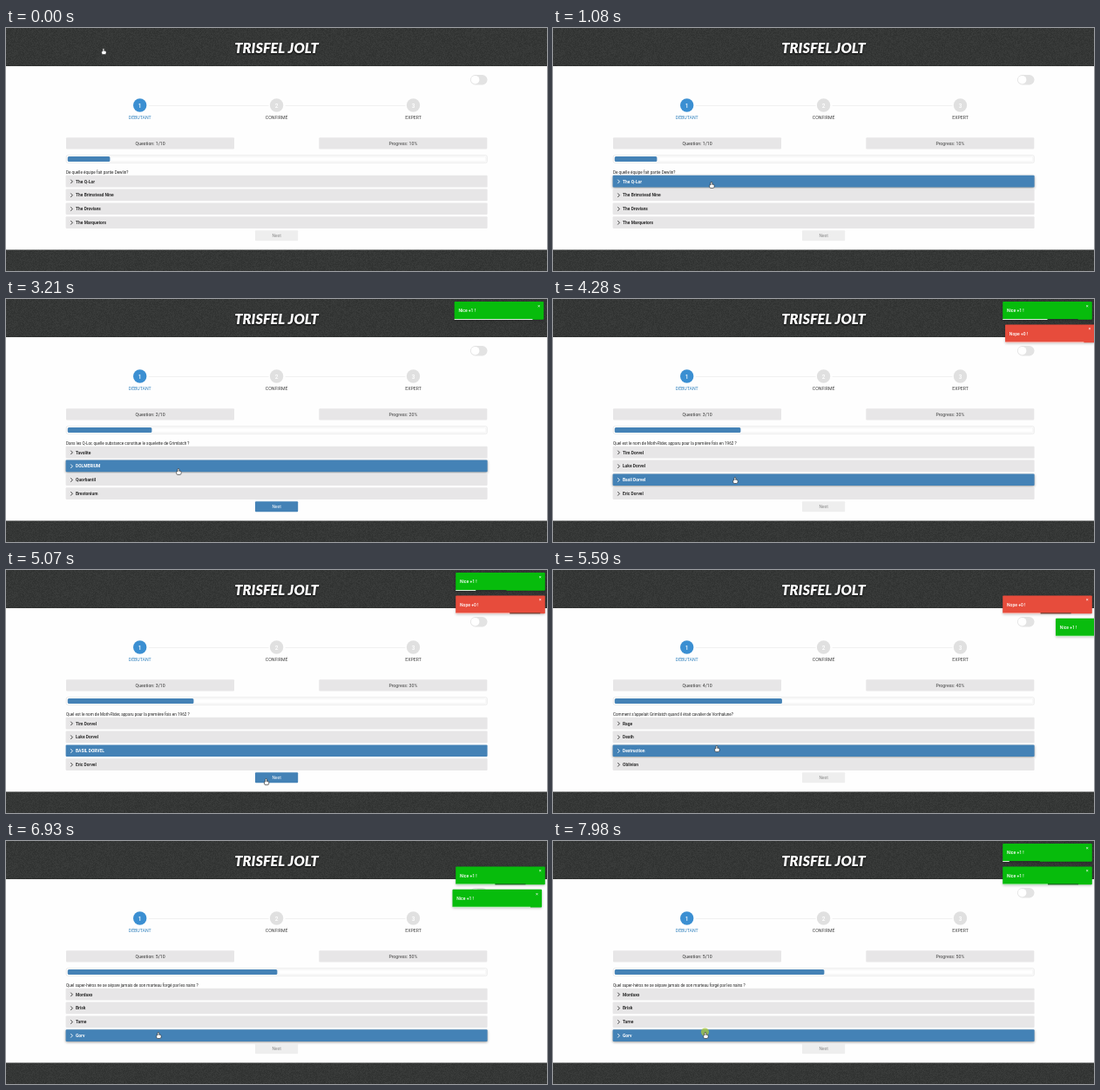
These frames come from a looping animation (621x280 px, 8 s). An HTML page with a canvas:

```html
<!DOCTYPE html>
<html lang="fr">
<head>
<meta charset="utf-8">
<title>Quiz</title>
<style>
html, body { margin: 0; width: 100%; height: 100%; overflow: hidden; background: #fff; }
canvas { display: block; }
</style>
</head>
<body>
<canvas id="stage" width="621" height="280"></canvas>
<script>
const ctx = document.getElementById('stage').getContext('2d');
const LOOP = 8000, BLUE = '#4482b6', GREY = '#e7e6e7', SANS = 'Roboto, sans-serif';
const HOME = [112, 23], NEXT = [300, 239], DIP = [215, 315];
const ROW_TOP = 170, ROW_STEP = 15.8;

// aim is where the pointer rests on the picked row
const questions = [
  { at: 530, pickAt: 1600, pick: 0, aim: [182, 177], text: 'De quelle équipe fait partie Dewlin?',
    options: ['The Q-Lor', 'The Brimstead Nine', 'The Drovians', 'The Marquetors'] },
  { at: 2740, pickAt: 3140, pick: 1, aim: [198, 195],
    text: 'Dans les Q-Lor, quelle substance constitue le squelette de Grimlatch ?',
    options: ['Tavolite', 'Dolmerium', 'Quorbantil', 'Brestonium'] },
  { at: 3825, pickAt: 4450, pick: 2, aim: [209, 205], wrong: true,
    text: 'Quel est le nom de Moth-Rider, apparu pour la première fois en 1962 ?',
    options: ['Tim Dorvel', 'Luke Dorvel', 'Basil Dorvel', 'Eric Dorvel'] },
  { at: 5215, pickAt: 5850, pick: 2, aim: [188, 202],
    text: 'Comment s’appelait Grimlatch quand il était cavalier de Vorthalune?',
    options: ['Rage', 'Death', 'Destruction', 'Oblivion'] },
  { at: 6450, pickAt: 8020, pick: 3, aim: [175, 220],
    text: 'Quel super-héros ne se sépare jamais de son marteau forgé par les nains ?',
    options: ['Mordaxo', 'Brisk', 'Tarne', 'Gorv'] }
];
const clicks = questions.flatMap(q => [q.at, q.pickAt - 60]).slice(1);

const clamp = v => Math.min(1, Math.max(0, v));
const mix = (a, b, u) => a + (b - a) * u;
const mixPoint = (p, q, u) => p.map((v, i) => mix(v, q[i], u));
const smooth = u => u * u * (3 - 2 * u);

function box(x, y, w, h, r, fill, stroke) {
  ctx.beginPath();
  ctx.roundRect(x, y, w, h, r);
  ctx.fillStyle = fill;
  ctx.fill();
  if (!stroke) return;
  ctx.strokeStyle = stroke;
  ctx.lineWidth = 0.7;
  ctx.stroke();
}

function disc(x, y, r, fill) {
  box(x - r, y - r, 2 * r, 2 * r, r, fill);
}

function label(text, x, y, font, color, align = 'left') {
  ctx.font = font;
  ctx.fillStyle = color;
  ctx.textAlign = align;
  ctx.fillText(text, x, y);
}

function shadow(color = 'transparent', blur = 0, dy = 0) {
  ctx.shadowColor = color;
  ctx.shadowBlur = blur;
  ctx.shadowOffsetY = dy;
}

function makeNoise() {
  const image = ctx.createImageData(621, 280);
  let seed = 7;
  for (let i = 0; i < image.data.length; i += 4) {
    seed = (seed * 1664525 + 1013904223) >>> 0;
    const v = 47 + seed / 2 ** 32 * 12;
    image.data.set([v, v + 2, v + 1, 255], i);
  }
  return image;
}
const noise = makeNoise();

function drawPage() {
  ctx.putImageData(noise, 0, 0);
  box(0, 44, 621, 211.6, 0, '#fefefe');
  shadow('#000', 2, 1);
  label('TRISFEL JOLT', 310.5, 28.5, 'italic 900 16.3px Lato, sans-serif', '#fff', 'center');
  shadow();

  box(533, 54, 19.5, 11.5, 5.7, '#e3e3e3');
  disc(538.6, 59.7, 4.8, '#fff');

  ['DÉBUTANT', 'CONFIRMÉ', 'EXPERT'].forEach((name, i) => {
    const x = 153.7 + i * 156.9;
    if (i) box(x - 147, 89, 138, 0.7, 0, '#ededed');
    disc(x, 89, 7.7, i ? '#e0e0e0' : '#3b8fd2');
    label(i + 1, x, 91.6, '500 6.5px ' + SANS, '#fff', 'center');
    label(name, x, 104.6, '5.2px ' + SANS, i ? '#444' : '#2f80bd', 'center');
  });
}

function pointerAt(t, n) {
  const { at, pickAt, aim } = questions[n], leave = pickAt + 90;
  if (t < leave) return mixPoint(n ? NEXT : HOME, aim, smooth(clamp((t - at - 30) / 330)));
  const u = clamp((t - leave) / (questions[n + 1].at - 140 - leave));
  return mixPoint(mixPoint(aim, DIP, u), mixPoint(DIP, NEXT, u), u);
}

function drawQuestion(t, n, hover) {
  const q = questions[n], picked = t >= q.pickAt;

  box(69, 126.2, 193, 13.2, 1, GREY);
  box(359.3, 126.2, 193, 13.2, 1, GREY);
  label(`Question: ${n + 1}/10`, 165.6, 134.7, '5.2px ' + SANS, '#333', 'center');
  label(`Progress: ${n + 1}0%`, 455.8, 134.7, '5.2px ' + SANS, '#444', 'center');

  const grown = n ? n + smooth(clamp((t - q.at) / 400)) : 1;
  box(69.2, 146.7, 483, 8.6, 1.5, '#fff', '#e2e2e2');
  box(71, 148.2, 480, 5.6, 1.5, '#fff', '#f0f0f0');
  box(70.8, 148, 48 * grown + 0.6, 6, 1.5, BLUE);

  label(q.text, 69, 168, '4.6px ' + SANS, '#222');
  q.options.forEach((name, i) => {
    const y = ROW_TOP + i * ROW_STEP, chosen = picked && i === q.pick;
    const active = chosen || i === hover;
    if (i === hover) shadow('rgba(0,0,0,.4)', 3, 1);
    box(68.6, y - 0.2, 484, 13.7, 1, active ? BLUE : GREY);
    shadow();
    ctx.beginPath();
    ctx.moveTo(74.3, y + 4.7);
    ctx.lineTo(76.4, y + 6.9);
    ctx.lineTo(74.3, y + 9.1);
    ctx.strokeStyle = active ? '#fff' : '#333';
    ctx.lineWidth = 0.9;
    ctx.stroke();
    label(chosen ? name.toUpperCase() : name, 80, y + 8.6, 'bold 4.9px ' + SANS, active ? '#fff' : '#2b2b2b');
  });

  box(286, 233.3, 49.2, 12, 1, picked ? BLUE : '#eee');
  label('Next', 310.6, 241, '5px ' + SANS, picked ? '#fff' : '#888', 'center');
}

// fast slide-in that overshoots, then a damped wobble
function slideIn(u) {
  if (u >= 1) return 0;
  const v = u - 0.6;
  return v < 0 ? 3025 * (1 - u / 0.6) ** 3 - 25
               : -25 * Math.exp(-6 * v) * Math.cos(Math.PI * v / 0.15);
}

function drawToast(x, y, age, wrong) {
  const left = 102 * (1 - clamp(age / 2850));
  shadow('rgba(0,0,0,.25)', 3, 1);
  box(x, y, 102.6, 20.8, 1, wrong ? '#e74c3c' : '#07bc0c');
  shadow();
  box(x, y + 20, left, 1, 0, 'rgba(255,255,255,.85)');
  if (age > 1000) box(x + left, y + 20, Math.min(35, 102 - left), 0.9, 0, '#26352b');
  label(wrong ? 'Nope +0 !' : 'Nice +1 !', x + 4.8, y + 12.4, '500 5px ' + SANS, '#fff');
  label('×', x + 97, y + 7, '5.5px ' + SANS, '#fff', 'center');
}

function drawToasts(t) {
  let y = 3;
  questions.slice(1).forEach(({ at, wrong }, i) => {
    const age = t - at - 130, leaving = age - 2330 - 260 * i;
    if (age < 0) return;
    const away = clamp((leaving - 140) / 560);
    const back = 20 * clamp(leaving / 140);
    const x = 516.2 + 0.32 * (slideIn(age / 700) - back + 2020 * smooth(away));
    ctx.globalAlpha = clamp(age / 250) * (1 - away);
    if (x < 621) drawToast(x, y, age, wrong);
    ctx.globalAlpha = 1;
    y += 26.4 * (1 - clamp((leaving - 700) / 300));
  });
}

function drawPointer(t, x, y, hand) {
  if (clicks.some(c => t >= c && t < c + 120)) disc(x - 0.5, y, 4.6, 'rgba(170,200,60,.75)');
  if (hand) {
    box(x - 2.2, y + 3.2, 5.2, 4.3, 1.5, '#fff', '#333');
    box(x - 1, y + 0.4, 1.8, 5, 0.9, '#fff', '#333');
    box(x - 1.6, y + 3.8, 4, 3, 1, '#fff');
    return;
  }
  ctx.fillStyle = '#fff';
  ctx.strokeStyle = '#333';
  ctx.lineWidth = 0.8;
  ctx.beginPath();
  ctx.moveTo(x, y);
  ctx.lineTo(x, y + 5.8);
  ctx.lineTo(x + 1.7, y + 4.5);
  ctx.lineTo(x + 4, y + 4.1);
  ctx.closePath();
  ctx.fill();
  ctx.stroke();
}

function frame() {
  const t = performance.now() % LOOP;
  const n = Math.max(0, questions.findLastIndex(q => t >= q.at));
  const [x, y] = pointerAt(t, n);
  const hover = x > 69 && x < 552 ? Math.floor((y - ROW_TOP) / ROW_STEP) : -1;
  const overNext = x > 286 && x < 335 && y > 233 && y < 245;
  drawPage();
  drawQuestion(t, n, hover);
  drawToasts(t);
  drawPointer(t, x, y, y < 44 || overNext || (hover >= 0 && hover < 4));
  requestAnimationFrame(frame);
}
frame();
</script>
</body>
</html>
```
